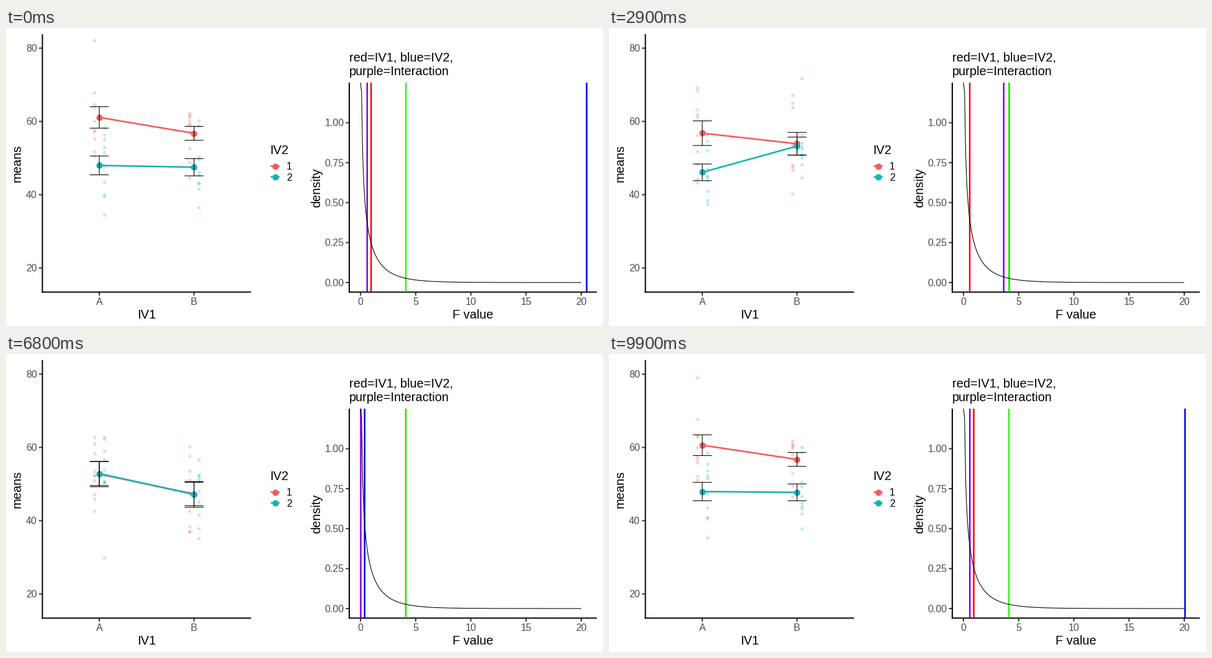
Recreate the animation shown at these times as a matplotlib script. Size 960 by 480 pixels, loop 10000 ms.

```python
import numpy as np
import matplotlib.pyplot as plt
from math import gamma
from matplotlib.animation import FuncAnimation
from matplotlib.collections import LineCollection

W, H, DPI = 960, 480, 80
PX = 72 / DPI  # points per pixel
FRAMES, STEP, HOLD = 100, 10, 5  # each simulation rests, then eases to the next
N = 10  # scores per cell
RED, TEAL = "#F35E5A", "#17B3B7"
CELL_X = [150, 150, 302.4, 302.4]
CELL_COLOR = [RED, TEAL, RED, TEAL]
F_COLORS = ["#FB0207", "#0000F0", "#8A00E6"]
plt.rcParams["font.family"] = "Liberation Sans"
plt.rcParams["path.snap"] = False
rng = np.random.default_rng(7)


def y_mean(v):
    return 386.5 - (np.asarray(v) - 20) * 5.9


def x_f(v):
    return 570 + 17.75 * np.asarray(v)


def y_density(v):
    return 410 - 257.4 * np.asarray(v)


def f_values(means, se):
    """F of both main effects and the interaction in the 2 x 2 design."""
    a1, a2, b1, b2 = means
    effects = np.array([a1 + a2 - b1 - b2, a1 - a2 + b1 - b2, a1 - a2 - b1 + b2]) / 2
    return effects ** 2 / np.mean(se ** 2)


def simulate(means, se):
    """Random scores with the given cell means and standard errors."""
    means, se = np.array(means), np.ones(4) * se
    z = rng.normal(size=(4, N))
    z -= z.mean(axis=1, keepdims=True)
    z /= z.std(axis=1, ddof=1, keepdims=True)
    scores = means[:, None] + z * se[:, None] * N ** 0.5
    return np.concatenate([scores.ravel(), se, f_values(means, se)])


# Cell means and standard errors, in the order A1, A2, B1, B2
wide = [3.75, 3.2, 2.93, 3.9]
sims = [
    simulate([61.1, 48.0, 56.75, 47.5], [2.93, 2.58, 1.9, 2.35]),
    simulate([53.7, 54.2, 52.4, 57.9], [2.95, 2.27, 3.03, 2.74]),
    simulate([52, 50, 55, 51], 3),
    simulate([57.3, 45.7, 53.8, 53.5], [3.4, 2.2, 3.1, 2.4]),
    simulate([49.9, 54.0, 47.7, 49.6], [2.95, 3.32, 4.93, 2.83]),
    simulate([50.5, 46.1, 56.3, 53.1], wide),
    simulate([56.0, 58.3, 44.0, 47.5], wide),
    simulate([51, 50, 49, 47], 3.3),
    simulate([52.4, 47.6, 50.9, 47.6], [3.48, 3.03, 4.2, 3.27]),
    simulate([56, 47.5, 56.5, 50], 1.87),
]

fig = plt.figure(figsize=(W / DPI, H / DPI), dpi=DPI, facecolor="white")
ax = fig.add_axes([0, 0, 1, 1])
ax.set(xlim=(0, W), ylim=(H, 0))
ax.axis("off")


def line(xs, ys, color, width, z=2):
    return ax.plot(xs, ys, color=color, lw=width * PX, zorder=z,
                   solid_capstyle="butt", snap=False)[0]


def dots(xs, ys, color, size, z, alpha=1):
    return ax.plot(xs, ys, "o", color=color, ms=size * PX, mew=0,
                   alpha=alpha, zorder=z, snap=False)[0]


def text(x, y, s, size=20, color="black", ha="left", angle=0):
    ax.text(x, y, s, fontsize=size * PX, color=color, ha=ha, va="baseline",
            rotation=angle, rotation_mode="anchor")


def axes_lines(left, top, right):
    line([left, left], [top, 426.4], "black", 1.95, 1)
    line([left - 1, right], [425.4, 425.4], "black", 1.95, 1)


def x_tick(x, s):
    line([x, x], [426, 431], "#333333", 1.95, 1)
    text(x, 446, s, 16, "#4D4D4D", "center")


def y_tick(axis, y, s):
    line([axis - 5.5, axis - 0.5], [y, y], "#333333", 1.95, 1)
    text(axis - 8.5, y + 5.8, s, 16, "#4D4D4D", "right")


# Means panel
axes_lines(58.5, 10, 394)
for v in (20, 40, 60, 80):
    y_tick(58.5, y_mean(v), str(v))
x_tick(CELL_X[0], "A")
x_tick(CELL_X[2], "B")
text(226, 468, "IV1", ha="center")
text(24, 218, "means", ha="center", angle=90)

# Legend
text(424, 203, "IV2")
for y, color, s in ((222.5, RED, "1"), (239.8, TEAL, "2")):
    line([425.5, 440], [y, y], color, 2.5)
    dots([432.7], [y], color, 10.2, 3)
    text(451, y + 6, s, 16)

# F panel
axes_lines(552, 88, 950)
for v in (0, 0.25, 0.5, 0.75, 1):
    y_tick(552, y_density(v), f"{v:.2f}")
for v in range(0, 21, 5):
    x_tick(x_f(v), str(v))
text(751, 468, "F value", ha="center")
text(505, 257, "density", ha="center", angle=90)
text(552, 54, "red=IV1, blue=IV2,")
text(552, 76, "purple=Interaction")

# Density of F(1, 36); it is infinite at zero and leaves through the top
beta = gamma(0.5) * gamma(18) / gamma(18.5)
fx = np.linspace(0.1, 20, 200)
density = (1 + fx / 36) ** -18.5 / (6 * beta * np.sqrt(fx))
line(x_f(np.r_[0, fx]), np.r_[88, y_density(density)], "black", 1.07, 6)
line(x_f([4.113, 4.113]), [88, 425], "#21FF06", 2.5, 5)
f_lines = [line([0, 0], [88, 425], c, 2.5, 4) for c in F_COLORS]

# Moving parts of the means panel
clouds = [dots(np.full(N, x + (-7.6 if c == RED else 7.6)), np.zeros(N), c, 5.4, 2, 0.27)
          for x, c in zip(CELL_X, CELL_COLOR)]
mean_lines = [line(CELL_X[::2], [0, 0], c, 2.6, 4) for c in (RED, TEAL)]
mean_dots = [dots(CELL_X[::2], [0, 0], c, 10.2, 3) for c in (RED, TEAL)]
bars = LineCollection([], colors="black", linewidths=1.07 * PX, zorder=5, snap=False)
ax.add_collection(bars)


def pose(i):
    k, r = divmod(i, STEP)
    t = max(r - HOLD, 0) / (STEP - HOLD)
    w = (1 - np.cos(np.pi * t)) / 2
    return (1 - w) * sims[k] + w * sims[(k + 1) % len(sims)]


def draw(i):
    scores, se, f = np.split(pose(i), [4 * N, 4 * N + 4])
    scores = scores.reshape(4, N)
    means = scores.mean(axis=1)
    for cloud, s in zip(clouds, scores):
        cloud.set_ydata(y_mean(s))
    for j in range(2):
        ys = y_mean(means[j::2])
        mean_lines[j].set_ydata(ys)
        mean_dots[j].set_ydata(ys)
    segments = []
    for x, m, e in zip(CELL_X, means, se):
        top, low = y_mean(m + e), y_mean(m - e)
        segments += [[(x, top), (x, low)]]
        segments += [[(x - 15.2, y), (x + 15.2, y)] for y in (top, low)]
    bars.set_segments(segments)
    for ln, x in zip(f_lines, x_f(f)):
        ln.set_xdata([x, x])
    return [*clouds, *mean_lines, *mean_dots, bars, *f_lines]


anim = FuncAnimation(fig, draw, frames=FRAMES, interval=100, repeat=True,
                     repeat_delay=0)
plt.show()
```
